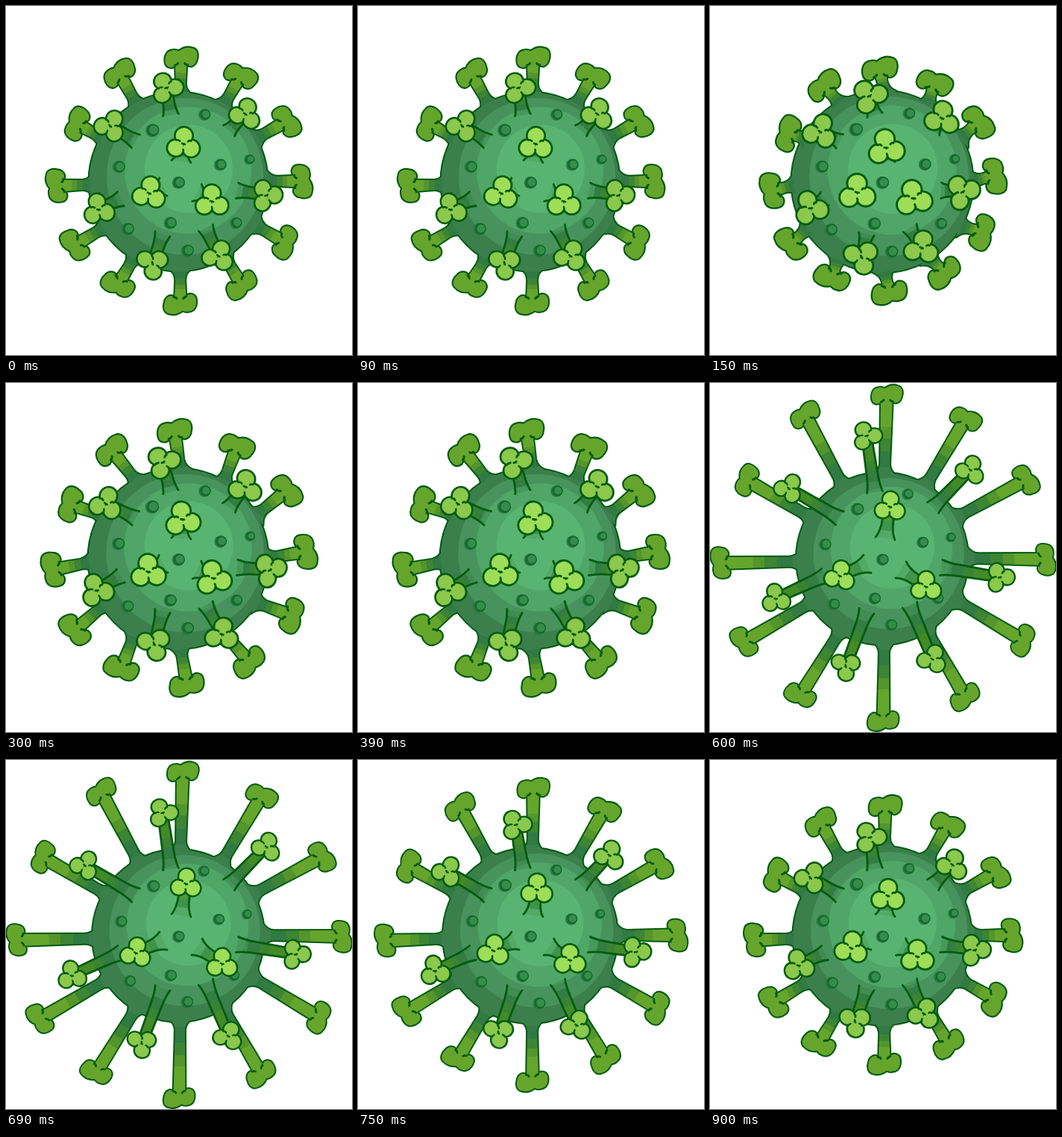
Write an HTML page with a canvas that moves like this. It is 464x467 px and loops after 1.05 s.

```html
<!DOCTYPE html>
<html lang="en">
<head>
<meta charset="utf-8">
<title>Pulsing virus</title>
<style>
html, body { margin: 0; width: 100%; height: 100%; overflow: hidden; background: #fff; }
canvas { display: block; width: 464px; height: 467px; }
</style>
</head>
<body>
<canvas id="stage" width="464" height="467"></canvas>
<script>
const ctx = document.getElementById('stage').getContext('2d');
const STEP = 150;
const INK = '#005c10', EDGE = '#3b7f4d', RAD = Math.PI / 180;
const REST = 163.5, REACH = 54;

// body radius, spike reach, swing in degrees, head scale
const POSES = [
  [119.5, 163.5, 0, 1],
  [121.5, 148.8, -2.7, 1.09],
  [120.5, 169, -3, 1.05],
  [115, 217.5, 0, .92],
  [115, 217, .45, .92],
  [117, 195, 0, .95],
  [119.5, 171.5, 0, .99]
];

// small deviations that keep the outer spikes from being perfectly regular
const ANGLE_OFF = [.6, 0, .6, -.2, -.1, -1, -.3, 1, -1.2, -2, -.7, .8];
const REACH_OFF = [2, 0, 1, 0, -.5, -2, 0, -2.5, 1, 1.5, -5.5, 2.5];

// base, resting head, stretched head, clover turn
const FRONT = [
  [221, 146, 215, 109, 209, 70, -30],
  [299, 167, 321, 144, 349, 115, 20],
  [310, 247, 349, 253, 389, 259, -30],
  [268, 297, 285, 334, 299, 369, 20],
  [210, 305, 197, 344, 183, 379, 60],
  [154, 258, 124, 272, 88, 289, -10],
  [174, 181, 140, 160, 105, 141, 30],
  [235, 208, 238, 184, 241, 165, 3],
  [211, 242, 192, 250, 174, 258, 10],
  [256, 250, 276, 261, 290, 272, 0]
];

const BUMPS = [
  [197, 166, 8], [267, 145, 7], [152, 215, 7.5], [288, 212, 7.2], [327, 205, 6],
  [232, 236, 7.5], [221, 290, 7.5], [309, 290, 7], [164, 298, 7.5], [244, 327, 7.5]
];

const bone = new Path2D('M-8 10C-12 15-20 13-21 6C-22-1-20-9-12-10C-8-11-5-10-3-9' +
  'C2-13 9-15 15-13C22-12 23-4 21 2C20 9 13 13 9 9Z');
const boneCrease = new Path2D('M-8 10Q-5 9-4 7M9 9Q6 9 5 7');

const lobes = new Path2D();
for (const [x, y, rx, ry] of [[0, -10.5, 10.8, 10.5], [-10, 6.5, 10.5, 10.3], [10.5, 6, 10.6, 10.6]]) {
  lobes.moveTo(x + rx, y);
  lobes.ellipse(x, y, rx, ry, 0, 0, 7);
}
const cloverCrease = new Path2D('M-10-4Q-7-5-5-3M10-4Q7-5 6-3M0 14Q1 10 0 8M-2 0L2 1');

function local(x, y, angle, draw, sx = 1, sy = sx) {
  ctx.save();
  ctx.translate(x, y);
  ctx.rotate(angle);
  ctx.scale(sx, sy);
  draw();
  ctx.restore();
}

function stroke(path, width, color = INK) {
  ctx.lineWidth = width;
  ctx.strokeStyle = color;
  ctx.stroke(path);
}

function fill(path, color) {
  ctx.fillStyle = color;
  ctx.fill(path);
}

function disc(x, y, rx, color, ry = rx) {
  const path = new Path2D();
  path.ellipse(x, y, rx, ry, 0, 0, 7);
  fill(path, color);
}

// stems grow upwards from the origin and flare at the foot
function stemPath(len, foot, waist, neck, flare) {
  const bend = Math.min(flare, len * .55);
  return new Path2D(`M${-foot} 0Q${-waist} ${-bend * .4} ${-waist} ${-bend}L${-neck} ${-len}` +
    `H${neck}L${waist} ${-bend}Q${waist} ${-bend * .4} ${foot} 0`);
}

function bands(len, stops) {
  const g = ctx.createLinearGradient(0, -len, 0, 0);
  stops.forEach(([end, color], i) => {
    g.addColorStop(i ? stops[i - 1][0] : 0, color);
    g.addColorStop(end, color);
  });
  return g;
}

function outerSpikes(radius, reach, swing) {
  return ANGLE_OFF.map((off, i) => {
    const a = (i * 30 + off) * RAD, b = a + swing * RAD;
    const d = reach + REACH_OFF[i], foot = radius - 4;
    const x = 233 + foot * Math.sin(a), y = 235 - foot * Math.cos(a);
    const hx = 233 + d * Math.sin(b), hy = 235 - d * Math.cos(b);
    const len = Math.hypot(hx - x, hy - y);
    return { x, y, hx, hy, len, turn: Math.atan2(hx - x, y - hy),
      tilt: b + swing * .6 * RAD, path: stemPath(len, 16, 6.5, 8, 16) };
  });
}

function drawBack(radius, reach, swing, scale) {
  const spikes = outerSpikes(radius, reach, swing);
  const headScale = 1 + (scale - 1) * .7;
  const body = new Path2D();
  body.arc(231, 235, radius, 0, 7);
  stroke(body, 4);
  for (const s of spikes) {
    local(s.x, s.y, s.turn, () => stroke(s.path, 4));
    local(s.hx, s.hy, s.tilt, () => stroke(bone, 4.2), headScale);
  }
  fill(body, EDGE);
  for (const s of spikes) {
    local(s.x, s.y, s.turn, () => fill(s.path, bands(s.len,
      [[.4, '#66a52c'], [.54, '#54952c'], [.7, '#3d8434'], [.9, '#317a43'], [1, EDGE]])));
    local(s.hx, s.hy, s.tilt, () => {
      fill(bone, '#66a52c');
      stroke(boneCrease, 3);
    }, headScale);
  }
}

function drawBody(radius) {
  const k = radius / 119.5;
  local(231, 235, 0, () => {
    disc(9, -7, 105, '#48935d');
    disc(13, -15, 85, '#50a667');
    disc(14, -17, 59, '#5ab471');
    for (const [x, y, r] of BUMPS) {
      const dx = x - 231, dy = y - 235;
      disc(dx - 1, dy + .5, r + .8, '#28773f');
      disc(dx + .5, dy, r, '#126a2b');
      disc(dx + 1, dy - .2, r - 2, '#368c4b');
    }
  }, k);
}

function drawFront(reach, swing, scale) {
  const t = (reach - REST) / REACH;
  const r = swing * .6 * RAD, sin = Math.sin(r), cos = Math.cos(r);
  FRONT.forEach(([x, y, x0, y0, x1, y1, turn], i) => {
    const dx = x0 + (x1 - x0) * t - 233, dy = y0 + (y1 - y0) * t - 235;
    const hx = 233 + dx * cos - dy * sin, hy = 235 + dx * sin + dy * cos;
    const len = Math.hypot(hx - x, hy - y), dir = Math.atan2(hx - x, y - hy);
    const central = i > 6;
    const stem = stemPath(len, central ? 13 : 10.5, 7.5, 6.5, 26);
    local(x, y, dir, () => {
      fill(stem, bands(len, central
        ? [[.5, '#479a38'], [.75, '#3d944b'], [1, 'rgba(61,148,75,.3)']]
        : [[.45, '#438b27'], [.62, '#398333'], [.82, '#337d42'], [1, 'rgba(51,125,66,.35)']]));
      stroke(stem, 2.8);
    });
    // ring heads are slightly foreshortened towards the rim
    const squash = central ? 1 : .92;
    local(hx, hy, dir, () => local(0, 0, (turn + swing * 4) * RAD - dir, () => {
      stroke(lobes, 5.4);
      fill(lobes, central ? '#9edd58' : '#8bc84b');
      stroke(cloverCrease, 2.7);
    }), scale * (central ? 1 : .97), scale * squash);
  });
}

function drawPose([radius, reach, swing, scale]) {
  ctx.fillStyle = '#fff';
  ctx.fillRect(0, 0, 464, 467);
  ctx.lineCap = ctx.lineJoin = 'round';
  drawBack(radius, reach, swing, scale);
  drawBody(radius);
  drawFront(reach, swing, scale);
}

let shown = -1;
function tick() {
  const index = Math.floor(performance.now() / STEP) % POSES.length;
  if (index !== shown) drawPose(POSES[shown = index]);
  requestAnimationFrame(tick);
}
tick();
</script>
</body>
</html>
```
